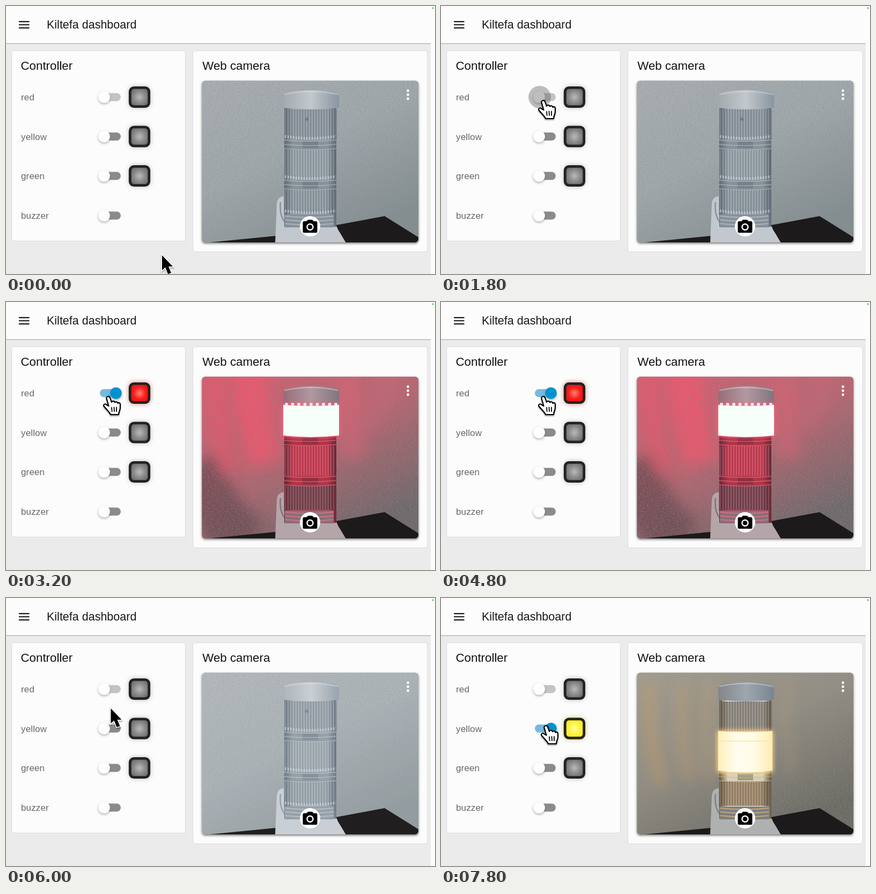
These frames come from a looping animation (800 px wide and 500 px high, 8 s). An HTML page:

```html
<!DOCTYPE html>
<html lang="en">
<head>
<meta charset="utf-8">
<title>Dashboard</title>
<style>
  html, body { margin: 0; width: 100%; height: 100%; overflow: hidden; background: #ebebeb; }
  svg { display: block; width: 800px; height: 500px; font-family: "Liberation Sans", Arial, sans-serif; }
  .app { font-size: 21.5px; fill: #171717; }
  .title { font-size: 22.3px; fill: #111; }
  .label { font-size: 17px; letter-spacing: .15px; fill: #666; }
  #exposure { mix-blend-mode: overlay; }
</style>
</head>
<body>
<svg id="stage" viewBox="0 0 800 500"></svg>
<script>
const LOOP = 8000, STEP = 200;

const rows = [
  { name: 'red', y: 170, lamp: ['#ff8078', '#f81c18', '#ee0c0c'], glow: '#ffaaa0', track: '#c4c4c4' },
  { name: 'yellow', y: 243.5, lamp: ['#ffffa0', '#fff235', '#f4e61c'], glow: '#fff38c', track: '#8b8b8b' },
  { name: 'green', y: 317, track: '#8b8b8b' },
  { name: 'buzzer', y: 391, track: '#8b8b8b' }
];

// Intervals in ms
const switched = { red: [2000, 5200], yellow: [7200, 8000] };
const lit = { red: [2200, 5400], yellow: [7400, 8000] };
const presses = [
  { row: 0, x: 184, span: [1600, 2000], color: '#555' },
  { row: 0, x: 205, span: [5000, 5200], color: '#0092d0' },
  { row: 1, x: 183, span: [6800, 7200], color: '#555' }
];
const moves = [
  { span: [0, 1400], from: [288, 466], to: [190, 176] },
  { span: [5600, 6400], from: [190, 176], to: [195, 238] }
];

const scenes = {
  off: {
    wall: ['#a9aeb2', '#a0a8ac', '#848d90'], cap: ['#a3a9ac', '#c2c8cb', '#8995a2'],
    glass: ['#8b959d', '#949fa6', '#8d98a0'], edge: '#616b76', ring: '#b6c1c9', base: '#c2c8ce', shade: '#87919b'
  },
  red: {
    wall: ['#d45f72', '#b96570', '#6f686b'], cap: ['#986c76', '#b298a0', '#82747e'],
    glass: ['#f7fffb', '#c7394f', '#78404c'], edge: '#692937', ring: '#ee7284', base: '#b4a5a9', shade: '#84707a', hot: 0
  },
  yellow: {
    wall: ['#a39e90', '#928d82', '#6c6a63'], cap: ['#83868a', '#9ea7ae', '#798592'],
    glass: ['#8c867c', '#fffbe5', '#9d8668'], edge: '#61543f', ring: '#d9b47c', base: '#afb1b1', shade: '#7e7f7f', hot: 1
  }
};

const rect = (x, y, w, h, attrs) => `<rect x="${x}" y="${y}" width="${w}" height="${h}" ${attrs}/>`;
const circle = (x, y, r, attrs) => `<circle cx="${x}" cy="${y}" r="${r}" ${attrs}/>`;
const text = (x, y, kind, words) => `<text x="${x}" y="${y}" class="${kind}">${words}</text>`;
const stops = colors => colors.map((c, i) =>
  `<stop offset="${i / (colors.length - 1)}" stop-color="${c}"/>`).join('');
const linear = (id, colors, x2, y2) =>
  `<linearGradient id="${id}" x2="${x2}" y2="${y2}">${stops(colors)}</linearGradient>`;
const radial = (id, colors) => `<radialGradient id="${id}" r=".65">${stops(colors)}</radialGradient>`;

function wallLight(name) {
  const streak = (d, color, width, opacity) =>
    `<path d="${d}" fill="none" stroke="${color}" stroke-width="${width}" opacity="${opacity}" filter="url(#soft)"/>`;
  if (name === 'red') return streak('M350 300Q380 390 450 450', '#65474e', 95, .7)
    + streak('M385 130Q395 230 412 320', '#f4536b', 34, .55)
    + streak('M455 130Q458 220 485 300', '#fb526b', 65, .65)
    + streak('M640 140Q640 230 650 290', '#e46176', 45, .5)
    + streak('M720 130Q690 190 680 240', '#d2667a', 45, .35);
  if (name === 'yellow') return streak('M390 160Q386 270 412 350', '#dfa25c', 14, .6)
    + streak('M450 160Q444 270 466 340', '#dca45f', 14, .5)
    + streak('M500 150Q488 260 503 340', '#d2a870', 16, .4)
    + streak('M645 150Q640 270 655 330', '#bfa47a', 18, .3);
  return '';
}

function tower(name, p) {
  const tops = [193, 269, 342], bottoms = [249, 324, 388];
  let out = rect(519, 190, 97, 222, `fill="url(#${name}G1)"`);
  tops.forEach((top, i) => {
    const height = bottoms[i] - top;
    out += rect(519, top, 98 - i * 2, height, `fill="url(#${name}G${i})"`)
      + rect(519, top, 98 - i * 2, height, 'fill="url(#ribs)"');
  });
  if (p.hot === undefined) {
    out += bottoms.map(y => `<path d="M520 ${y - 6}Q567 ${y + 2} 615 ${y - 6}" fill="none" stroke="#e2eaee"
      stroke-width="5" stroke-dasharray="3 2" opacity=".45"/>`).join('') + circle(561, 211, 3, 'fill="#5d6290" opacity=".6"');
  }
  [250, 325].forEach(y => {
    out += rect(518, y, 98, 19, `fill="${p.edge}" opacity=".25"`) + rect(553, y + 3, 29, 12, `fill="${p.edge}" opacity=".45"`);
    out += [2, 10, 18].map(dy => `<path d="M518 ${y + dy - 2}Q567 ${y + dy + 3} 616 ${y + dy - 2}"
      fill="none" stroke="${p.ring}" stroke-width="1.6" opacity=".6"/>`).join('');
  });
  out += rect(520, 389, 91, 24, `fill="${p.shade}"`);
  out += [392, 399, 406].map(y => `<path d="M520 ${y}Q566 ${y + 5} 611 ${y}" fill="none" stroke="${p.ring}"
    stroke-width="1.8" opacity=".7"/>`).join('');
  out += `<path d="M517 168Q517 157 569 157Q621 157 621 168V190Q569 196 517 190Z" fill="url(#${name}Cap)"/>
    <path d="M519 165Q569 154 619 165" fill="none" stroke="#dde3e6" stroke-width="2" opacity=".5"/>`;
  if (p.hot === 0) {
    out += rect(515, 190, 107, 61, 'rx="4" fill="#ff6079" filter="url(#glow)"')
      + '<path d="M517 192Q568 196 621 192V249Q568 255 517 249Z" fill="#f7fffb"/>'
      + Array.from({ length: 9 }, (_, i) => circle(523 + i * 11.5, 191, 3, 'fill="#ffe8ea"')).join('');
  }
  if (p.hot === 1) {
    out += rect(515, 247, 104, 79, 'rx="5" fill="#ffd888" filter="url(#glow)"')
      + '<path d="M517 248Q567 253 618 248V322Q567 328 517 322Z" fill="url(#yellowHot)"/>'
      + '<path d="M520 267H614" stroke="#ffeaa8" stroke-width="2"/>';
  }
  return out;
}

function scene(name) {
  const p = scenes[name];
  const glass = p.glass.map((c, i) => linear(`${name}G${i}`, [p.edge, c, c, c, c, c, p.edge], 1, 0)).join('');
  return `<g id="scene-${name}"><defs>${linear(name + 'Wall', p.wall, .65, 1)}${linear(name + 'Cap', p.cap, 1, 0)}${glass}</defs>
    ${rect(365, 139, 405, 303, `fill="url(#${name}Wall)"`)}${wallLight(name)}
    ${rect(365, 139, 405, 303, 'filter="url(#paper)"')}
    <path d="M370 442L502 429L620 408L706 392L770 432V442Z" fill="#1c1a1a"/>
    <path d="M502 442L505 368Q507 355 518 355V390H612Q614 412 624 425L634 442Z" fill="${p.base}"/>
    <path d="M512 366Q509 390 521 405M519 404Q565 422 612 405" fill="none" stroke="${p.shade}" stroke-width="2.5"/>
    ${tower(name, p)}</g>`;
}

const control = ({ name, y, track, lamp, glow }, i) => `
  ${text(28, y + 6, 'label', name)}
  ${rect(175, y - 7.5, 39, 15, `id="track${i}" rx="7.5" fill="${track}"`)}
  ${circle(183, y, 10.8, `id="thumb${i}" fill="#fefefe" filter="url(#thumbShadow)"`)}
  ${i < 3 ? rect(229, y - 20, 40, 40, 'rx="10" fill="#bbb" filter="url(#glow)"')
    + rect(231.3, y - 17.7, 35.4, 35.4, 'rx="7.5" fill="url(#lampOff)" stroke="#222" stroke-width="4.8"') : ''}
  ${lamp ? `<g id="lamp${i}">${rect(229, y - 20, 40, 40, `rx="10" fill="${glow}" filter="url(#glow)"`)}
    ${rect(231.3, y - 17.7, 35.4, 35.4, `rx="7.5" fill="url(#lamp-${name})" stroke="#222" stroke-width="4.8"`)}</g>` : ''}`;

const card = (x, w, h) => rect(x + .5, 83.5, w, h, 'rx="4" fill="#fcfcfc" stroke="#d9d9e4"');

document.getElementById('stage').innerHTML = `
  <defs>
    ${radial('lampOff', ['#bababa', '#888', '#5e5e5e'])}
    ${rows.slice(0, 2).map(r => radial('lamp-' + r.name, r.lamp)).join('')}
    ${linear('yellowHot', ['#ffefb8', '#fffdf0', '#fffbe6', '#ffecb0'], 1, 0)}
    <pattern id="ribs" width="5" height="60" patternUnits="userSpaceOnUse">
      ${rect(0, 0, 1.5, 60, 'fill="#eef2f4" opacity=".22"')}${rect(2.5, 0, 1.5, 60, 'fill="#2c3038" opacity=".15"')}
    </pattern>
    <filter id="soft" filterUnits="userSpaceOnUse" x="300" y="80" width="500" height="420"><feGaussianBlur stdDeviation="13"/></filter>
    <filter id="glow" x="-50%" y="-50%" width="200%" height="200%"><feGaussianBlur stdDeviation="4"/></filter>
    <filter id="thumbShadow" x="-50%" y="-50%" width="200%" height="200%">
      <feDropShadow dx="0" dy="2" stdDeviation="2.2" flood-color="#555" flood-opacity=".5"/></filter>
    <filter id="panelShadow" x="-5%" y="-5%" width="110%" height="110%">
      <feDropShadow dx="0" dy="2" stdDeviation="2" flood-color="#333" flood-opacity=".7"/></filter>
    <filter id="cursorShadow" x="-50%" y="-50%" width="200%" height="200%">
      <feDropShadow dx="0" dy="2" stdDeviation="1.3" flood-opacity=".4"/></filter>
    <filter id="paper" x="0" y="0" width="100%" height="100%">
      <feTurbulence type="fractalNoise" baseFrequency=".25 .5" numOctaves="2" seed="4"/>
      <feColorMatrix values="0 0 0 0 .25  0 0 0 0 .27  0 0 0 0 .28  1 0 0 0 -.42"/>
    </filter>
    <clipPath id="view">${rect(365.5, 139.5, 403.5, 301.5, 'rx="6"')}</clipPath>
  </defs>
  ${rect(0, 0, 800, 500, 'fill="#ebebeb"')}
  ${rect(0, 0, 792, 70, 'fill="#fcfcfc"')}${rect(0, 69.5, 792, 1.3, 'fill="#b0b0b0"')}
  ${rect(792, 0, 8, 500, 'fill="#fcfcfc"')}${circle(796, 4, 1.8, 'fill="#6fce6f"')}
  <path d="M24 29.2H43.5M24 35H43.5M24 40.8H43.5" stroke="#1d1d1d" stroke-width="2.2"/>
  ${text(76, 42, 'app', 'Kiltefa dashboard')}
  ${card(10, 324, 355)}${card(348, 437.5, 375)}
  ${text(27.5, 119, 'title', 'Controller')}${text(366.3, 119, 'title', 'Web camera')}
  ${rows.map(control).join('')}
  ${rect(365.5, 139.5, 403.5, 301.5, 'rx="6" fill="#aaa" filter="url(#panelShadow)"')}
  <g clip-path="url(#view)">${Object.keys(scenes).map(scene).join('')}
    ${rect(365, 139, 405, 303, 'id="exposure" fill="#e8f2f6" opacity=".15"')}</g>
  ${[158, 165.5, 173].map(y => circle(749.5, y, 2.4, 'fill="#fff"')).join('')}
  ${circle(567, 411, 19, 'fill="#fefefe"')}
  <g transform="translate(550.8 396.1) scale(1.35)">
    <path d="M9 2L7.2 4H4Q2 4 2 6V18Q2 20 4 20H20Q22 20 22 18V6Q22 4 20 4H16.8L15 2Z"/>
    ${circle(12, 12, 4.1, 'fill="none" stroke="#fff" stroke-width="1.8"')}
  </g>
  ${presses.map((p, i) => circle(p.x, rows[p.row].y, 21, `id="press${i}" fill="${p.color}" opacity=".38"`)).join('')}
  <g id="cursor" filter="url(#cursorShadow)">
    <path id="arrow" d="M3-1V27L9 21.5L14 34L20 32L15 20H23Z" stroke="#fff" stroke-width="3" paint-order="stroke"/>
    <g id="hand" transform="translate(0 1)" stroke="#000" stroke-width="2.2" stroke-linejoin="round" stroke-linecap="round">
      <path fill="#fff" d="M-2.5 3C-3.5-1 2.5-2.5 4 1.5L7 10C8 7 12 7 13 10.5C15 8 18 9 18.5 12C20 10 23 11 23 14V20C23 25 20 28 20 33H5C3 28-3 23-7 18C-10 14-5 12-2 15L1.5 17Z"/>
      <path d="M7 20L7.7 27M11.5 19.5L12 27M16 19.5V27" stroke-width="1.8"/>
    </g>
  </g>`;

const el = id => document.getElementById(id);
const within = (t, span) => t >= span[0] && t < span[1];
const show = (id, visible) => { el(id).style.display = visible ? '' : 'none'; };

function pointer(t) {
  const move = moves.filter(m => t >= m.span[0]).pop();
  const k = Math.min(1, (t - move.span[0]) / (move.span[1] - move.span[0]));
  const eased = k * k * (3 - 2 * k);
  return move.from.map((v, i) => v + (move.to[i] - v) * eased);
}

function draw(t) {
  rows.slice(0, 2).forEach(({ name, track }, i) => {
    const on = within(t, switched[name]);
    el('track' + i).setAttribute('fill', on ? '#76b9dd' : track);
    el('thumb' + i).setAttribute('cx', on ? 205 : 183);
    el('thumb' + i).setAttribute('fill', on ? '#0092d0' : '#fefefe');
    show('lamp' + i, within(t, lit[name]));
  });
  const current = Object.keys(lit).find(name => within(t, lit[name])) || 'off';
  Object.keys(scenes).forEach(name => show('scene-' + name, name === current));
  show('exposure', within(t, [5400, 6400]));
  presses.forEach((p, i) => show('press' + i, within(t, p.span)));
  const [x, y] = pointer(t);
  const hovering = x < 220 && rows.some(r => Math.abs(y - r.y) < 20);
  el('cursor').setAttribute('transform', `translate(${x} ${y})`);
  show('hand', hovering);
  show('arrow', !hovering);
}

let shown = -1;
function tick() {
  const t = Math.floor(performance.now() % LOOP / STEP) * STEP;
  if (t !== shown) draw(shown = t);
  requestAnimationFrame(tick);
}
tick();
</script>
</body>
</html>
```
